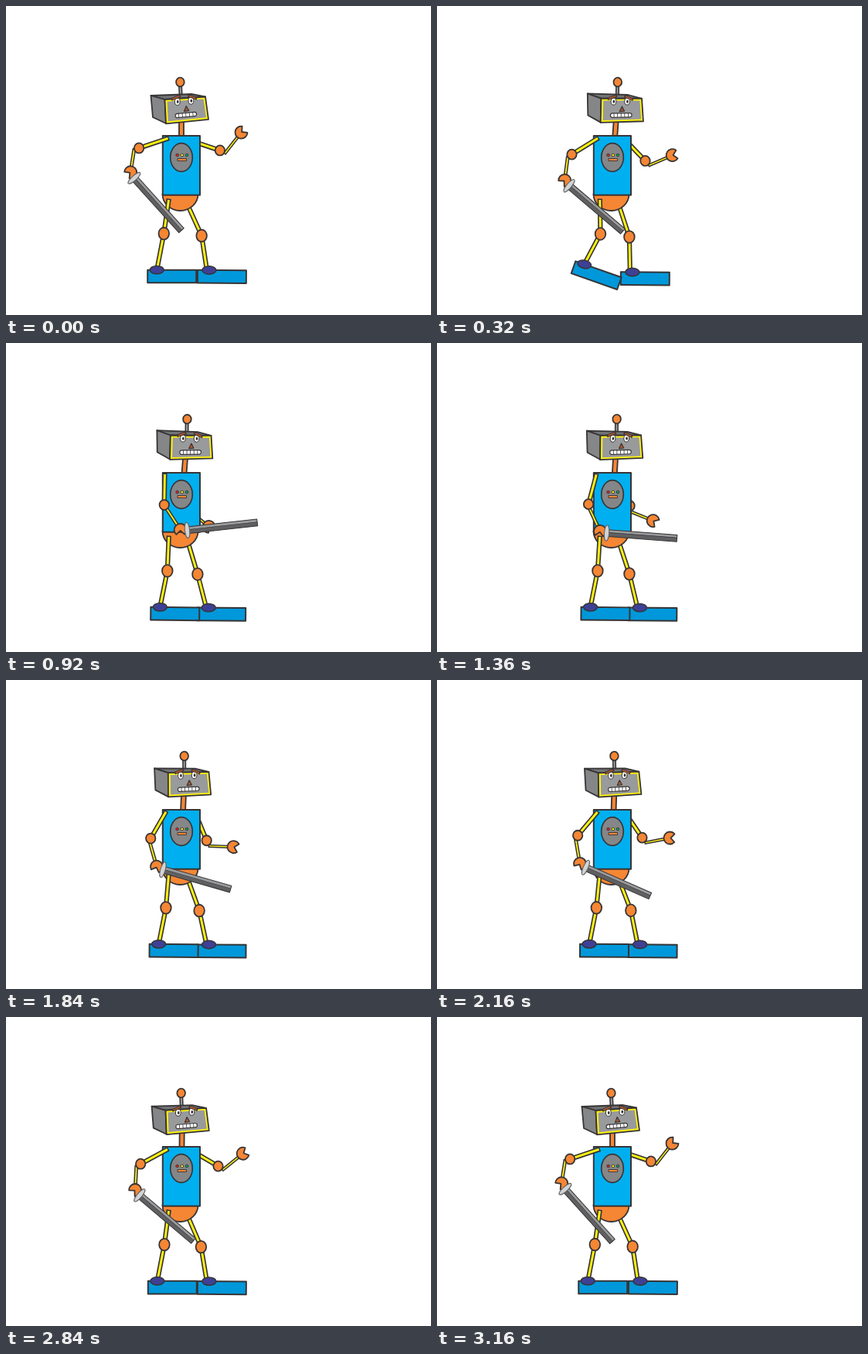
Recreate the animation shown at these times as an HTML page with a canvas. Size 550 by 400 pixels, loop 3200 ms.

```html
<!DOCTYPE html>
<html lang="en">
<head>
<meta charset="utf-8">
<title>Robot with sword</title>
<style>
html, body { margin: 0; width: 100%; height: 100%; overflow: hidden; background: #fff; }
canvas { display: block; }
</style>
</head>
<body>
<canvas id="stage" width="550" height="400"></canvas>
<script>
const ctx = document.getElementById('stage').getContext('2d');
ctx.lineJoin = 'round';
const LOOP = 3200, STEP = 40, STRIDE = 560, GUARD = 920, END = 3160;
const RAD = Math.PI / 180;
const INK = '#373435', ORANGE = '#f58634', YELLOW = '#fff212', BLUE = '#00afef',
      SHOE = '#0098da', NAVY = '#3e4095', GRAY = '#848688', PALE = '#999a9c',
      DARK = '#606062', BROWN = '#b5562c';

// Limb angles are in degrees from straight down, positive to the right.
const rest = { shoulder: 211, up: -71.6, low: -9, sword: 48, freeUp: 71.6, freeLow: -52,
  head: 0, thigh: -8.2, shin: -10.9, foot: 0, farThigh: 24.4, farShin: 12.4 };
const stride = { shoulder: 208, up: 3, low: 42, sword: 23.8, freeUp: 23, freeLow: -2,
  head: 7, thigh: 7.6, shin: -40.7, foot: 34, farThigh: 13.4, farShin: -0.6 };
const guard = { shoulder: 205.5, up: -1, low: 33, sword: -6.3, freeUp: -12, freeLow: 40,
  head: 4.3, thigh: -2.5, shin: -11.4, foot: 0.7, farThigh: 16.7, farShin: 18.2 };

function mix(a, b, k) {
  const p = {};
  for (const key in a) p[key] = a[key] + (b[key] - a[key]) * k;
  return p;
}

// Linear rise and fall between two times
const hump = (t, from, to) => Math.max(0, 1 - Math.abs(2 * (t - from) / (to - from) - 1));

function poseAt(t) {
  const p = t < STRIDE ? mix(rest, stride, t / STRIDE)
    : t < GUARD ? mix(stride, guard, (t - STRIDE) / (GUARD - STRIDE))
    : mix(guard, rest, Math.min(1, (t - GUARD) / (END - GUARD)));
  const windup = hump(t, 0, 520), thrust = hump(t, STRIDE, GUARD);
  p.up += 72 * thrust - 38 * windup;
  p.low += 45 * thrust - 36 * windup;
  p.sword += 8 * windup - 8 * thrust;
  return p;
}

// Point at a distance along a limb angle
const swing = ([x, y], deg, len) => [x + len * Math.sin(deg * RAD), y + len * Math.cos(deg * RAD)];

function paint(fill, width = 2, ink = INK) {
  if (fill) { ctx.fillStyle = fill; ctx.fill(); }
  if (width) { ctx.lineWidth = width; ctx.strokeStyle = ink; ctx.stroke(); }
}

function poly(pts, fill, width) {
  ctx.beginPath();
  for (let i = 0; i < pts.length; i += 2) ctx.lineTo(pts[i], pts[i + 1]);
  ctx.closePath();
  paint(fill, width);
}

function oval(x, y, rx, ry, fill, width, ink) {
  ctx.beginPath();
  ctx.ellipse(x, y, rx, ry, 0, 0, 2 * Math.PI);
  paint(fill, width, ink);
}

function box(x, y, w, h, fill, width) {
  ctx.beginPath();
  ctx.rect(x, y, w, h);
  paint(fill, width);
}

function at([x, y], deg, draw) {
  ctx.save();
  ctx.translate(x, y);
  ctx.rotate(deg * RAD);
  draw();
  ctx.restore();
}

function rod(a, b, w = 6.2, core = 2.9, color = YELLOW) {
  const dx = b[0] - a[0], dy = b[1] - a[1], len = Math.hypot(dx, dy);
  at(a, Math.atan2(dy, dx) / RAD, () => {
    box(0, -w / 2, len, w, INK, 0);
    box(1.5, -core / 2, len - 3, core, color, 0);
  });
}

function claw(p, mouth) {
  at(p, mouth, () => {
    ctx.beginPath();
    ctx.moveTo(1, 0);
    ctx.arc(0, 0, 8, 42 * RAD, 318 * RAD);
    ctx.closePath();
    paint(ORANGE, 1.8);
  });
}

function leg(hip, knee, ankle, rodEnd, foot, heel) {
  at(ankle, foot, () => box(-heel, 0, 63, 16.7, SHOE, 2));
  rod(hip, knee);
  rod(knee, rodEnd);
  oval(...knee, 6.8, 7.8, ORANGE, 1.8);
  at(ankle, foot * 0.6, () => oval(0, 0, 9, 5.2, NAVY, 1.5));
}

function farLeg(p) {
  const hip = [236, 259.5];
  const knee = swing(hip, p.farThigh, 41.5), ankle = swing(knee, p.farShin, 45.7);
  leg(hip, knee, ankle, [ankle[0] - 3, ankle[1]], 0.4, 15);
}

function nearLeg(p) {
  const hip = [210.8, 249.5];
  const knee = swing(hip, p.thigh, 45.5), ankle = swing(knee, p.shin, 48 - 0.18 * p.foot);
  leg(hip, knee, ankle, ankle, p.foot, 12);
}

function freeArm(p) {
  const shoulder = [247, 177];
  const elbow = swing(shoulder, p.freeUp, 34 - 0.035 * p.freeUp);
  const wrist = swing(elbow, p.freeUp * 0.7, 7.4);
  const hand = swing(wrist, 90 - p.freeLow, 33 - 0.05 * p.freeLow);
  rod(shoulder, elbow);
  rod(wrist, hand, 4.4, 1.4);
  oval(...elbow, 6.2, 6.5, ORANGE, 1.8);
  claw(hand, p.freeLow + 12);
}

function swordArm(p) {
  const back = Math.max(0, -p.up);
  const shoulder = [p.shoulder, 168.5 + 0.035 * back];
  const elbow = swing(shoulder, p.up, 41);
  const joint = swing(elbow, 33 - 1.7 * back, 3.5 + 0.035 * back);
  const hand = swing(joint, p.low, 32.3 + 0.08 * p.low);
  rod(shoulder, elbow);
  rod(joint, hand, 4.8, 1.8);
  oval(...elbow, 6.2, 6.5, ORANGE, 1.8);
  claw(hand, p.sword + 95);
  at(hand, p.sword, () => {
    ctx.translate(0, 1.5);
    box(11, -4.4, 89, 8.8, DARK, 0);
    box(11, -4.4, 89, 3.6, PALE, 0);
    box(11, -4.4, 89, 8.8, null, 1);
    box(11, -1, 89, 0.6, INK, 0);
    oval(8.8, 0, 3.1, 10.3, '#d2d3d5', 1, DARK);
  });
}

function face() {
  for (const x of [221.8, 239.4]) {
    const y = 123.8 - (x - 221.8) * 0.07;
    oval(x, y, 3.4, 4.6, '#fff', 1);
    oval(x + 0.4, y + 0.2, 1.4, 2, INK, 0);
  }
  rod([214, 121.2], [225.5, 116], 3.6, 1.8, BROWN);
  rod([235.5, 115.8], [247, 120], 3.6, 1.8, BROWN);
  poly([233.2, 129.5, 230.5, 136.4, 236.7, 135.4], BROWN, 1.2);
  at([232.8, 141], -5, () => {
    ctx.beginPath();
    ctx.roundRect(-13.8, -2.7, 27.6, 5.4, 2.6);
    paint('#fff', 1.2);
    for (let x = -9.2; x < 12; x += 4.6) box(x - 0.4, -2.7, 0.8, 5.4, INK, 0);
  });
}

function head(p) {
  at([227 + 1.17 * p.head, 152], p.head, () => {
    ctx.translate(-227, -152);
    rod([225.5, 103], [226.3, 118], 5, 2, PALE);
    oval(225.4, 98.5, 5.3, 5.8, ORANGE, 1.8);
    poly([187.5, 116, 240, 114, 258, 117.5, 205.5, 121], '#727376', 1.8);
    poly([187.5, 116, 205.5, 121, 207, 152, 190, 144], GRAY, 1.8);
    poly([205.5, 121, 258, 117.5, 262, 146.8, 207, 152.3], YELLOW, 1.8);
    poly([208.6, 123.7, 255.6, 120.5, 259, 144.3, 209.8, 149.2], PALE, 0);
    face();
  });
}

function torso(p) {
  ctx.beginPath();
  ctx.ellipse(225.5, 243.5, 23, 21.5, 0, 0, Math.PI);
  ctx.closePath();
  paint(ORANGE, 1.8);
  const top = 227 + 1.17 * p.head, foot = 227 + 0.83 * p.head;
  poly([top - 3, 149, top + 3, 149, foot + 3, 168, foot - 3, 168], ORANGE, 1.8);
  box(202.8, 168, 48.2, 76.8, BLUE, 2);
  oval(227, 196, 14.3, 18.4, GRAY, 1.6);
  ['#e31e24', YELLOW, '#00a859'].forEach((c, i) => oval(221.6 + i * 6.2, 193, 1.8, 1.8, c, 0.9));
  box(222, 197.5, 11.5, 3, ORANGE, 0.9);
}

function draw(t) {
  const p = poseAt(t);
  ctx.fillStyle = '#fff';
  ctx.fillRect(0, 0, 550, 400);
  [freeArm, farLeg, torso, head, nearLeg, swordArm].forEach(part => part(p));
}

const start = performance.now();
function tick() {
  const t = (performance.now() - start) % LOOP;
  draw(Math.floor(t / STEP) * STEP);
  requestAnimationFrame(tick);
}
tick();
</script>
</body>
</html>
```
